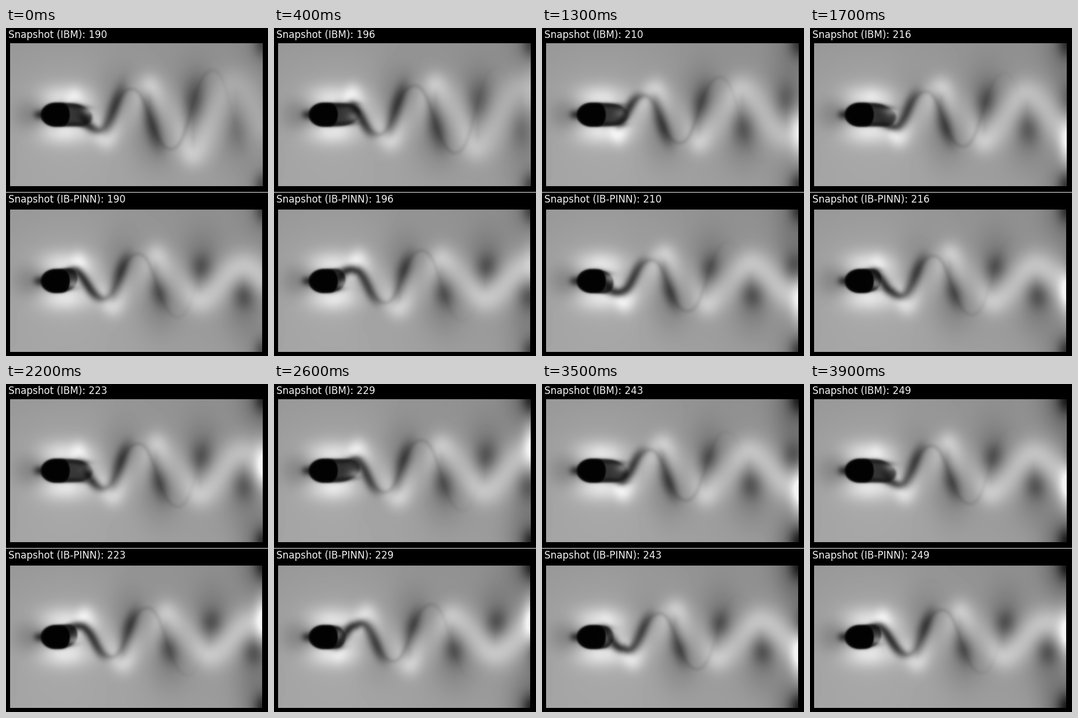
Animation, 448 px wide and 560 px high, one loop 4 s. Source, as a matplotlib script:

```python
import numpy as np
import matplotlib.pyplot as plt
from matplotlib.animation import FuncAnimation

W, H, DPI = 448, 560, 100
FRAMES, INTERVAL = 40, 100
FIRST, LAST = 190, 249

# Mean position of successive vortices, half a shedding period apart
MARKS = np.polyfit(range(-2, 5), [95, 140, 198, 260, 335, 407, 478], 3)
P_GRID = np.linspace(-2.6, 5.2, 400)


def place(p):
    return np.polyval(MARKS, p)


def gauss(u):
    return np.exp(-0.5 * u * u)


def step(u):
    return 1 / (1 + np.exp(-np.clip(u, -40, 40)))


def spot(dx, dy, sx, sy):
    return gauss(dx / sx) * gauss(dy / sy)


class Wake:
    """Speed field behind a cylinder, drawn as a grey panel."""

    def __init__(self, left, right, top, bottom, axis, period, start, bubble, decay):
        self.box = np.s_[top:bottom, left:right]
        self.x = np.arange(left, right, dtype=np.float32) + 0.5
        y = np.arange(top, bottom, dtype=np.float32) + 0.5 - axis
        self.y = y[:, None]
        self.edges = y[0], y[-1]
        self.period, self.start = period, start
        self.bubble, self.decay = bubble, decay
        self.p = np.interp(self.x, place(P_GRID), P_GRID)
        self.light, self.body = self.still_parts()

    def still_parts(self):
        x, y = self.x, self.y
        light = 0.615 + 0.05 * spot(x - 110, y, 75, 75) + 0.0002 * y
        light = light - 0.03 * step((x - 260) / 50)
        for side in (-1, 1):
            light = light + 0.22 * spot(x - 100, y - 29 * side, 34, 16)
        light = light * (1 - 0.2 * spot(x - 42, y, 20, 22))
        light = light * (1 - 0.6 * spot(x - 57, y, 7, 6))
        return light, 1 - 0.95 * self.capsule(24, 0)

    def capsule(self, length, shift):
        """Soft mask: round nose, blunt tail ending at the given length."""
        dx = (self.x - 85) / np.where(self.x < 85, 25, length)
        q = np.where(dx < 0, dx ** 2, dx ** 4) + ((self.y - shift) / 20) ** 2
        return step((1 - q) / 0.1)

    def distance(self, curve, reach=24):
        """Distance of every pixel to a curve given by height."""
        curve = np.pad(curve.astype(np.float32), reach, mode="edge")
        best = np.full((len(self.y), len(self.x)), 1e6, np.float32)
        for k in range(-reach, reach + 1):
            gap = self.y - curve[reach + k:reach + k + len(self.x)]
            np.minimum(best, gap * gap + k * k, out=best)
        return np.sqrt(best)

    def near_wake(self, streak):
        x, y = self.x, self.y
        end = 85 + self.bubble
        side = np.interp(end - 6, x, streak)
        shift = 0.25 * side * step((x - end + 18) / 6)
        core = 0.72 * self.capsule(self.bubble, shift)
        core = core * (1 - 0.55 * spot(x - end + 6, y + 0.4 * side, 9, 6))
        layers = 0.45 * gauss((abs(y - shift) - 16) / 3.5)
        layers = layers * step((end - 6 - x) / 5) * step((x - 80) / 6)
        return (1 - core) * (1 - layers)

    def outlet(self, light, ribbon, age):
        """Bright jet and dark corners that build up at the right edge."""
        x, y = self.x, self.y
        jet = 0.32 * min(1, 2.2 * age)
        light = light + jet * spot(x - 442, y - 1.8 * ribbon[-1], 11, 28)
        for edge in self.edges:
            light = light * (1 - (0.45 + 0.3 * age) * spot(x - 440, y - edge, 11, 16))
            light = light * (1 - (0.1 + 0.25 * age) * spot(x - 437, y - edge, 26, 36))
        return light

    def frame(self, n):
        x, y = self.x, self.y
        shift = 2 * (n - self.start) / self.period
        young = np.exp(-n / 22) if self.decay else 0
        theta = np.pi * (self.p - shift)

        # Meandering streak shed from the two shear layers
        reach = np.interp(x, [110, 140, 165, 205, 270, 370], [17, 20, 30, 42, 56, 80])
        streak = -reach * np.tanh(0.9 * np.sin(theta + 0.3)) / np.tanh(0.9)
        d = self.distance(streak)
        near = 0.76 * step((162 - x) / 11) * step((x - 70 - self.bubble) / 6)
        middle = 0.32 * np.cos(theta) ** 2 * gauss((x - 190) / (36 + 35 * young))
        thin = 0.1 * step((x - 150) / 10) * step((290 + 70 * young - x) / 20)
        shade = (1 - near * gauss(d / 6)) * (1 - middle * gauss(d / 8))
        shade = shade * (1 - thin * gauss(d / 3)) * self.near_wake(streak)

        # Fast ribbon, above the lower vortices and below the upper ones
        lag = np.pi * np.interp(x, [110, 150, 240, 340], [0.08, 0.18, 0.42, 0.5])
        swing = np.interp(x, [100, 150, 235, 300, 400], [30, 38, 45, 35, 23])
        swing = swing * (1 + 1.2 * young * step((x - 290) / 18))
        ribbon = -swing * np.sin(theta - lag)
        width = np.interp(x, [120, 300, 430], [13, 17, 21])
        glow = 0.21 * step((x - 118) / 9)
        glow = glow * (1 - 0.6 * np.cos(theta - lag) ** 2 * step((310 - x) / 25))
        glow = glow * (1 - 0.6 * young * step((x - 350) / 15))
        light = self.light + glow * gauss(self.distance(ribbon) / width)
        light = self.outlet(light, ribbon, n / (LAST - FIRST))

        # Rows of slow vortices drifting downstream
        first = int(np.ceil(-1 - shift))
        for m in range(first, first + 7):
            cx = place(m + shift)
            side = -1 if m % 2 == 0 else 1
            cy = side * np.interp(cx, [160, 210, 300, 420], [14, 21, 23, 27])
            sx = np.interp(cx, [180, 350], [8, 13])
            sy = np.interp(cx, [180, 350], [17, 16]) * (1 + 0.6 * young)
            tilt = 0.3 * side * np.interp(cx, [200, 330], [1, 0.2])
            power = step((cx - 170) / 9) * (1 - 0.6 * young * step((cx - 350) / 15))
            dx, dy = x - cx, y - cy
            shade = shade * (1 - 0.36 * power * spot(dx - tilt * dy, dy, sx, sy))
            shade = shade * (1 - 0.16 * power * spot(dx, y - 1.7 * cy, 24, 36))

        return np.clip(light * shade * self.body, 0, 0.95)


panels = [
    Wake(7, 439, 26, 270, 148, 30.4, 33, 62, True),
    Wake(7, 438, 310, 553, 432, 29.5, 0, 37, False),
]

fig = plt.figure(figsize=(W / DPI, H / DPI), dpi=DPI, facecolor="black")
ax = fig.add_axes([0, 0, 1, 1])
ax.axis("off")

canvas = np.zeros((H, W))
canvas[280] = 0.92
image = ax.imshow(canvas, cmap="gray", vmin=0, vmax=1, aspect="auto",
                  interpolation="nearest", extent=(0, W, H, 0))
ax.set_xlim(0, W)
ax.set_ylim(H, 0)
names = ["IBM", "IB-PINN"]
labels = [ax.text(3.5, base, "", color="0.95", family="DejaVu Sans", size=12,
                  va="baseline") for base in (17, 298)]


def draw(k):
    n = (3 * k + 1) // 2
    for panel, label, name in zip(panels, labels, names):
        canvas[panel.box] = panel.frame(n)
        label.set_text(f"Snapshot ({name}): {FIRST + n}")
    image.set_data(canvas)
    return [image, *labels]


anim = FuncAnimation(fig, draw, frames=FRAMES, interval=INTERVAL,
                     repeat=True, repeat_delay=0, blit=False)
plt.show()
```
